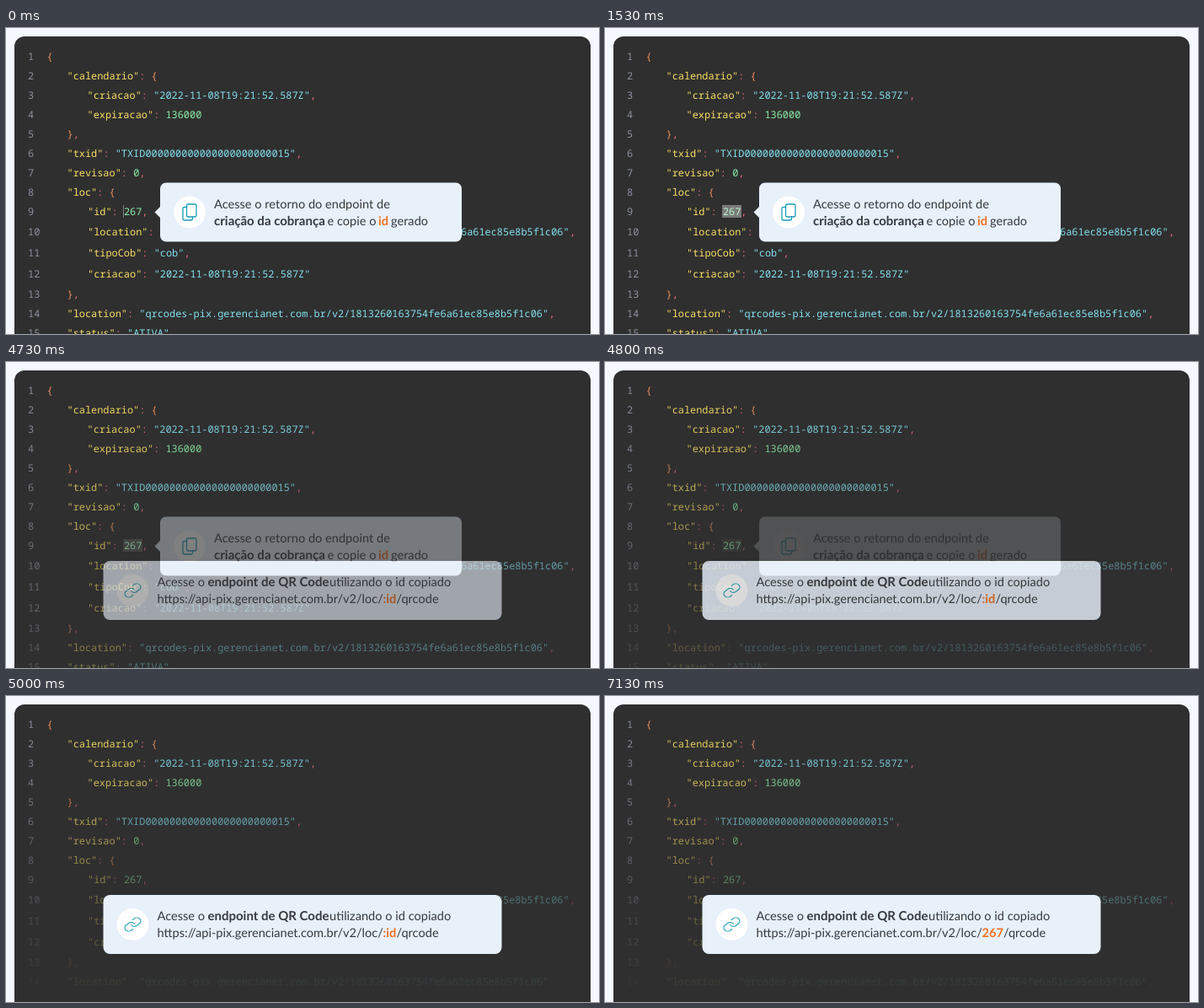
Animation of 704 by 363 pixels, one loop 8000 ms. Source, as an HTML page:

```html
<!DOCTYPE html>
<html lang="pt-BR">
<head>
<meta charset="utf-8">
<title>Copiar id da cobrança</title>
<style>
  html, body { margin: 0; width: 100%; height: 100%; overflow: hidden; background: #f5f8fe; }
  svg { display: block; }
  text { text-rendering: geometricPrecision; white-space: pre; }
  .code { font: 500 11.917px "Noto Sans Mono", monospace; }
  .note { font: 14.6px Lato, sans-serif; fill: #36393f; }
  .bold { font-weight: 700; font-size: 15px; }
  .accent { font-weight: 700; fill: #f37021; }
  .icon { fill: none; stroke: #1a9fb5; stroke-width: 1.3; stroke-linecap: round; stroke-linejoin: round; }
  /* the two tips cross-dissolve: their opacities add up where they overlap */
  #tips { isolation: isolate; }
  #linkTip, #after { mix-blend-mode: plus-lighter; }
  #swap { isolation: isolate; }
</style>
</head>
<body>
<svg width="704" height="363" viewBox="0 0 704 363">
  <defs>
    <linearGradient id="shade" x1="0" y1="0" x2="0" y2="1">
      <stop offset="0" stop-color="#2f2f2f" stop-opacity="0"/>
      <stop offset="1" stop-color="#2f2f2f"/>
    </linearGradient>
  </defs>
  <rect x="10" y="10" width="684" height="380" rx="12" fill="#2f2f2f"/>
  <g id="code" class="code"></g>
  <rect id="selection" x="139" y="210" height="15" fill="#fff" fill-opacity=".36"/>
  <rect id="dim" x="11" y="24" width="682" height="339" fill="url(#shade)"/>

  <g id="tips">
    <g id="copyTip">
      <path d="M190 183.500H534a7 7 0 0 1 7 7V246.500a7 7 0 0 1-7 7H190a7 7 0 0 1-7-7V225L176.500 218.500L183 212V190.500a7 7 0 0 1 7-7Z" fill="#e8f0fa"/>
      <circle cx="218" cy="218.500" r="19" fill="#fff"/>
      <g class="icon">
        <rect x="214.500" y="209" width="11.500" height="15" rx="2"/>
        <path d="M214.500 212.500H212a2 2 0 0 0-2 2V226a2 2 0 0 0 2 2H219.500a2 2 0 0 0 2-2V224"/>
      </g>
      <g class="note">
        <text x="247" y="214">Acesse o retorno do endpoint de</text>
        <text x="247" y="234" class="bold">criação da cobrança</text>
        <text x="381.500" y="234">e copie o</text>
        <text x="442" y="234" class="accent">id</text>
        <text x="457" y="234">gerado</text>
      </g>
    </g>

    <g id="linkTip">
      <rect x="115.500" y="236" width="473" height="70" rx="8" fill="#e8f0fa"/>
      <circle cx="150.500" cy="271" r="19" fill="#fff"/>
      <g class="icon" transform="translate(150.500 271) scale(.95 .8)">
        <path id="link" d="M-2 1a5 5 0 0 0 7.540.540l3-3a5 5 0 0 0-7.070-7.070l-1.720 1.710"/>
        <use href="#link" transform="rotate(180)"/>
      </g>
      <g class="note">
        <text x="179.500" y="266">Acesse o</text>
        <text x="239.500" y="266" class="bold">endpoint de QR Code</text>
        <text x="384" y="266">utilizando o id copiado</text>
        <text x="179.500" y="286">https://api-pix.gerencianet.com.br/v2/loc/</text>
        <g id="swap">
          <g id="before">
            <text x="447.500" y="286" class="accent">:id</text>
            <text x="463.500" y="286">/qrcode</text>
          </g>
          <g id="after">
            <text x="447.500" y="286" class="accent">267</text>
            <text x="473" y="286">/qrcode</text>
          </g>
        </g>
      </g>
    </g>
  </g>
</svg>
<script>
const LOOP = 8000, FPS = 15, CHAR = 7.15;
const el = id => document.getElementById(id);

// [x, baseline, content]
const url = '"location": "qrcodes-pix.gerencianet.com.br/v2/1813260163754fe6a61ec85e8b5f1c06",';
const lines = [
  [48.5, 38, '{'],
  [72.5, 61, '"calendario": {'],
  [96.5, 84, '"criacao": "2022-11-08T19:21:52.587Z",'],
  [96.5, 107, '"expiracao": 136000'],
  [72.5, 130, '},'],
  [72.5, 153, '"txid": "TXID000000000000000000000015",'],
  [72.5, 176, '"revisao": 0,'],
  [72.5, 199, '"loc": {'],
  [97, 222, '"id": 267,'],
  [97, 246, url],
  [97, 271, '"tipoCob": "cob",'],
  [97, 296, '"criacao": "2022-11-08T19:21:52.587Z"'],
  [72.5, 320, '},'],
  [72.5, 343, url],
  [72.5, 366, '"status": "ATIVA",']
];

function addText(x, y, fill, content) {
  const node = document.createElementNS('http://www.w3.org/2000/svg', 'text');
  node.setAttribute('x', x);
  node.setAttribute('y', y);
  node.setAttribute('fill', fill);
  node.textContent = content;
  el('code').append(node);
}

function colorOf(token, next) {
  if (token[0] === '"') return next === ':' ? '#fbdf65' : '#83e1f0';
  if (/\d/.test(token)) return '#8cf0a8';
  return /[{}]/.test(token) ? '#f5915a' : '#ee6a7c';
}

lines.forEach(([x, y, content], i) => {
  addText(26, y, '#8d919e', i + 1);
  for (const m of content.matchAll(/"[^"]*"|\d+|[{}:,]/g)) {
    const next = content[m.index + m[0].length];
    addText(x + m.index * CHAR, y, colorOf(m[0], next), m[0]);
  }
});

const progress = (step, from, to) => Math.min(1, Math.max(0, (step - from) / (to - from)));
const fade = (id, opacity) => el(id).setAttribute('opacity', opacity);

// cubic-bezier(.25, .1, .25, 1), solved by bisection
function ease(x) {
  const curve = (s, a, b) => 3 * s * (1 - s) ** 2 * a + 3 * s * s * (1 - s) * b + s ** 3;
  let lo = 0, hi = 1;
  for (let i = 0; i < 20; i++) {
    const mid = (lo + hi) / 2;
    if (curve(mid, .25, .25) < x) lo = mid; else hi = mid;
  }
  return x <= 0 ? 0 : x >= 1 ? 1 : curve(lo, .1, 1);
}

function render(ms) {
  const step = Math.floor((ms % LOOP + 4) * FPS / 1000);
  // both dissolves begin just after a step
  const swap = step < 70 ? 0 : ease(progress(step, 68.8, 75));
  const fill = step < 99 ? 0 : ease(progress(step, 97.8, 107));
  el('selection').setAttribute('width', 1 + 22 * progress(step, 5, 23));
  fade('selection', 1 - swap);
  fade('dim', swap);
  fade('copyTip', 1 - swap);
  fade('linkTip', swap);
  fade('before', 1 - fill);
  fade('after', fill);
}

const start = performance.now();
function tick() {
  render(performance.now() - start);
  requestAnimationFrame(tick);
}
tick();
</script>
</body>
</html>
```
